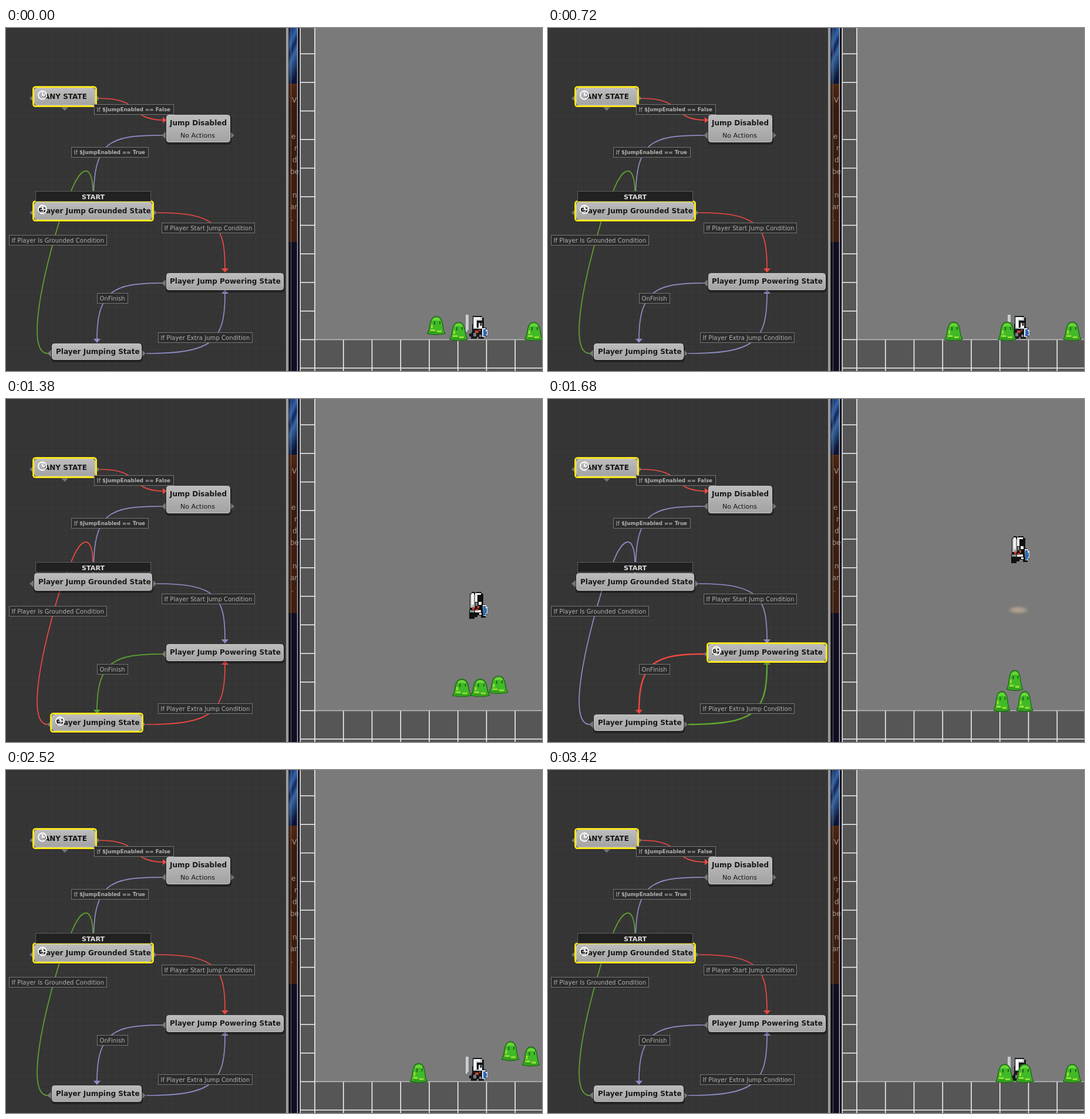
An HTML page that plays this animation: 913x585 px, repeating every 3.48 s.

```html
<!DOCTYPE html>
<html lang="en">
<head>
<meta charset="utf-8">
<title>Jump state machine</title>
<style>
html, body { margin: 0; width: 100%; height: 100%; overflow: hidden; background: #343434; }
svg { display: block; width: 913px; height: 585px; font-family: "DejaVu Sans", Verdana, sans-serif; }
.name { font-weight: bold; font-size: 12px; fill: #171717; }
.label rect { fill: #2c2c2c; stroke: #757575; }
.label text { font-size: 10px; letter-spacing: .07px; fill: #b2b2b2; }
.label .var { font-weight: bold; font-size: 8.7px; letter-spacing: 0; }
.edge path { fill: none; stroke: var(--c); stroke-width: var(--w, 1.7); }
.edge polygon { fill: var(--c); }
.port { fill: #777; }
.ring { fill: none; stroke: #f8e41c; stroke-width: 3; }
.clock { fill: none; stroke: #fff; stroke-width: 1.8; }
.grid { stroke: #f2f2f2; stroke-width: 1.6; fill: none; }
</style>
</head>
<body>
<svg id="stage" viewBox="0 0 913 585">
  <defs>
    <linearGradient id="steel" x2="0" y2="1"><stop stop-color="#bdbdbd"/><stop offset="1" stop-color="#a3a3a3"/></linearGradient>
    <linearGradient id="sky" x2=".35" y2="1">
      <stop stop-color="#10204e"/><stop offset=".3" stop-color="#2f64ae"/><stop offset=".45" stop-color="#12265a"/>
      <stop offset=".6" stop-color="#3468a8"/><stop offset="1" stop-color="#0a1538"/>
    </linearGradient>
    <linearGradient id="wood" x2="0" y2="1"><stop stop-color="#522710"/><stop offset=".16" stop-color="#371a0d"/><stop offset="1" stop-color="#40200f"/></linearGradient>
    <pattern id="mesh" width="12" height="12" patternUnits="userSpaceOnUse">
      <path d="M0 .5H12M.5 0V12" stroke="#000" stroke-opacity=".08"/>
    </pattern>
    <filter id="blur" x="-50%" y="-100%" width="200%" height="300%"><feGaussianBlur stdDeviation="3 2.2"/></filter>
    <clipPath id="view"><rect x="502" width="411" height="585"/></clipPath>
    <g id="slime">
      <path d="M-15-2Q-12-7-11-16Q-9-31 0-31Q9-31 11-16Q12-7 15-2Q8 0 0 0Q-8 0-15-2Z" fill="#40ba27" stroke="#226d17" stroke-width="1.6"/>
      <path d="M-12-3Q0 0 12-3L10-7Q0-3-10-7Z" fill="#319e1e"/>
      <path d="M-6-27Q0-31 6-27L7-23Q0-26-7-23Z" fill="#6bd63b"/>
      <path d="M-10-9h8v3h-8zM1-7h8v3h-8zM-9-17h3v6h-3z" fill="#97e036"/>
      <path d="M-4-23h2v6h-2zM5-23h2v5h-2z" fill="#1b6a18"/>
    </g>
  </defs>
  <rect width="477" height="585" fill="#363636"/>
  <rect width="477" height="585" fill="url(#mesh)"/>
  <g id="edges"></g>
  <g id="nodes"></g>
  <g id="labels"></g>

  <rect x="477" width="4.5" height="585" fill="#9a9a9a"/>
  <rect x="481.5" width="20.5" height="585" fill="#0b0a14"/>
  <rect x="486" width="10" height="585" fill="#100e22"/>
  <rect x="482" width="15" height="95" fill="url(#sky)"/>
  <rect x="482" y="95" width="15" height="270" fill="url(#wood)"/>
  <path d="M485.5 0V585" stroke="#68686f"/>
  <g id="scraps" font-size="12" fill="#a69b94"></g>
  <path d="M496.5 0V585" stroke="#b4b4bd" stroke-width="1.4"/>
  <path d="M501.2 0V585" stroke="#eee" stroke-width="1.6"/>

  <g clip-path="url(#view)">
    <rect x="502" width="411" height="585" fill="#7a7a7a"/>
    <g id="world">
      <rect x="502" y="-60" width="24" height="700" fill="#565656"/>
      <rect x="502" y="531" width="411" height="90" fill="#565656"/>
      <path id="tiles" class="grid"/>
      <path d="M526 531.5H913" stroke="#bcbcbc" stroke-width="1.4"/>
      <ellipse id="dust" cx="801" cy="360" rx="14" ry="5" fill="#c9b299" filter="url(#blur)"/>
      <g id="stand"></g>
      <g id="leap"></g>
      <g id="slimes"></g>
    </g>
  </g>
</svg>
<script>
const LOOP = 3480, STEP = 60;
const RED = '#ee4842', GREEN = '#5fa42f', IDLE = '#8f8dc6';
const $ = id => document.getElementById(id);

function add(parent, tag, attrs = {}, text) {
  const el = document.createElementNS('http://www.w3.org/2000/svg', tag);
  for (const k in attrs) el.setAttribute(k, attrs[k]);
  if (text) el.textContent = text;
  parent.append(el);
  return el;
}

function edge(d, arrow) {
  const g = add($('edges'), 'g', { class: 'edge' });
  add(g, 'path', { d });
  if (arrow) add(g, 'polygon', { points: arrow });
  return (color, width = 1.7) => {
    g.style.setProperty('--c', color);
    g.style.setProperty('--w', width);
  };
}

function port(x, y, dir) {
  const d = { l: 'l7-6v12z', r: 'l-7-6v12z', d: 'l-6-6h12z' }[dir];
  add($('nodes'), 'path', { class: 'port', d: `M${x} ${y}${d}` });
}

function node(x, y, w, h, title, tx, ty, cx) {
  const g = add($('nodes'), 'g');
  add(g, 'rect', { x: x - 1, y: y + 1, width: w + 3, height: h + 3, rx: 5, fill: '#000', opacity: .35 });
  add(g, 'rect', { x: x + .5, y: y + .5, width: w - 1, height: h - 1, rx: 4, fill: 'url(#steel)', stroke: '#c4c4c4' });
  add(g, 'text', { x: tx, y: ty, class: 'name' }, title);
  const mark = add(g, 'g', { visibility: 'hidden' });
  if (cx) {
    const cy = ty - 6.5;
    add(mark, 'rect', { x: x - 1.5, y: y - 1.5, width: w + 3, height: h + 3, rx: 4, class: 'ring' });
    add(mark, 'circle', { cx, cy, r: 7, class: 'clock' });
    add(mark, 'path', { d: `M${cx} ${cy - 5}v5h5`, class: 'clock' });
  }
  return on => mark.setAttribute('visibility', on ? 'visible' : 'hidden');
}

function label(x, y, w, text, variable) {
  const g = add($('labels'), 'g', { class: 'label' });
  add(g, 'rect', { x: x + .5, y: y + .5, width: w - 1, height: 17 });
  add(g, 'text', { x: x + 4.5, y: y + 12.5 }, text);
  if (variable) add(g, 'text', { x: x + 14, y: y + 12, class: 'var' }, variable);
}

// Graph
edge('M160 120C235 120 206 157 270 157', '267,152 274,157 267,162')(RED);
edge('M266 183C175 183 149 192 149 297')(IDLE);
const toGround = edge('M71 555C38 555 54 452 91 329L111 278C128 235 147 230 148 278V297');
const toPower = edge('M257 315C362 315 373 340 373 411', '367,410 379,410 373,417');
const toJump = edge('M266 435C185 435 155 447 155 531', '149,530 161,530 155,537');
const toExtra = edge('M239 555C352 555 373 535 373 453', '367,453 379,453 373,446');

[[40, 120, 'l'], [160, 120, 'r'], [100, 141, 'd'], [265, 183, 'l'], [389, 183, 'r'],
 [40, 315, 'l'], [257, 315, 'r'], [265, 435, 'l'], [70, 555, 'l'], [238, 555, 'r']].forEach(p => port(...p));

node(48, 102, 104, 30, 'ANY STATE', 65, 121, 62)(true);
node(273, 148, 109, 47, 'Jump Disabled', 279, 166);
add($('nodes'), 'text', { x: 297, y: 187, 'font-size': 11.1, fill: '#171717' }, 'No Actions');
const marks = {
  ground: node(48, 297, 201, 30, 'Player Jump Grounded State', 55, 316, 62),
  power: node(273, 418, 200, 29, 'Player Jump Powering State', 279, 436, 287),
  jump: node(78, 538, 153, 28, 'Player Jumping State', 85, 556, 92)
};
add($('nodes'), 'rect', { x: 50.5, y: 278.5, width: 196, height: 17, fill: '#212121', stroke: '#5d5d5d' });
add($('nodes'), 'text', { x: 129, y: 292, 'font-size': 11.2, 'font-weight': 'bold', fill: '#ddd' }, 'START');
label(150, 130, 136, 'If', '$JumpEnabled == False');
label(111, 203, 132, 'If', '$JumpEnabled == True');
label(265, 332, 159, 'If Player Start Jump Condition');
label(5, 353, 167, 'If Player Is Grounded Condition');
label(155, 452, 53, 'OnFinish');
label(259, 519, 161, 'If Player Extra Jump Condition');

[['V', 487, 127], ['e', 486, 189], ['r', 491, 209], ['d', 488, 229], ['be', 484, 249],
 ['n', 488, 289], ['ar', 484, 309], ['.', 486, 329]].forEach(([s, x, y]) => add($('scraps'), 'text', { x, y }, s));

// Game view
let grid = 'M526 -60V640';
for (let i = -2; i < 10; i++) grid += `M502 ${44 + i * 48.75}h24`;
for (let i = 1; i < 9; i++) grid += `M${526 + i * 48.75} 531v110`;
$('tiles').setAttribute('d', grid + 'M502 531.5h24M502 580H913');

const blocks = (id, list) => list.forEach(([fill, d]) => add($(id), 'path', { fill, d }));
blocks('stand', [
  ['#15171a', 'M795 491h16v3h3v17h4v16h-4v3h-9v-3h-3v3h-10v-4h-3v-8h5v-13h1z'],
  ['#c9cccf', 'M783 489h5v3h3v23h-5v3h-3z'],
  ['#77797c', 'M788 492h3v23h-3zM784 518h9v3h-9zM796 520h5v6h-5zM806 523h4v4h-4z'],
  ['#c3c8ca', 'M796 493h15v20h-15z'],
  ['#f3f5f5', 'M797 493h11v4h-7v14h-4zM805 507h6v5h-6z'],
  ['#15171a', 'M802 499h10v4h-10zM802 503h3v8h-3zM808 503h2v5h-2z'],
  ['#cf4030', 'M799 516h6v4h-6zM806 514h2v3h-2z'],
  ['#e8eef2', 'M811 512h6v3h3v9h-3v3h-6z'],
  ['#2e69b5', 'M813 514h4v3h2v6h-2v3h-4z']
]);
blocks('leap', [
  ['#111', 'M790 493h3v-3h5v1h3v-1h9v3h3v18h4v3h2v16h-2v4h-8v-4h-6v3h-5v3h-9v-16h1z'],
  ['#bcbfc1', 'M791 494h7v23h-7z'],
  ['#f1f2f2', 'M793 492h4v20h-4zM799 492h10v3h-6v12h-4z'],
  ['#85888a', 'M797 496h2v21h-2zM790 521h8v4h-8zM800 508h3v6h-3z'],
  ['#f3f3ef', 'M805 507h5v5h-5zM799 521h10v4h-10zM806 526h4v3h-4z'],
  ['#d2452e', 'M794 516h4v4h-4zM803 514h3v4h-3zM800 519h4v3h-4z'],
  ['#dbe7ef', 'M812 512h6v3h2v12h-2v4h-5z'],
  ['#316bb0', 'M813 514h4v4h2v8h-2v4h-4z']
]);

// Hops: start, end, from x, to x, height
const hops = [
  [[-30, 420, 736, 691, 40], [780, 1100, 691, 778, 40], [1300, 1560, 778, 773, 30], [1720, 2060, 773, 703, 40], [2760, 3180, 703, 778, 39]],
  [[150, 480, 771, 782, 36], [860, 1100, 782, 806, 36], [1300, 1560, 806, 812, 30], [1740, 2060, 812, 898, 40], [2300, 2600, 898, 893, 36]],
  [[200, 500, 899, 893, 36], [1180, 1450, 893, 820, 40], [1470, 1875, 820, 772, 36], [2250, 2680, 772, 911, 40], [2850, 3290, 911, 812, 47]]
];
const slimes = hops.map(() => add($('slimes'), 'use', { href: '#slime' }));

function slimeAt(list, t) {
  let pos = [list[0][2], 0];
  for (const [a, b, x0, x1, h] of list) {
    if (t < a) break;
    const p = Math.min(1, (t - a) / (b - a));
    pos = [x0 + (x1 - x0) * p, 4 * h * p * (1 - p)];
  }
  return pos;
}

function track(points, t) {
  for (let i = 1; i < points.length; i++) {
    const [a, u] = points[i - 1], [b, v] = points[i];
    if (t <= b) return u + (v - u) * (1 - Math.cos(Math.PI * (t - a) / (b - a))) / 2;
  }
  return points[points.length - 1][1];
}

const stretch = [[0, 0], [1140, .2], [1420, -.5], [1680, 1], [2100, -1], [2400, .5], [2940, .1], [LOOP, 0]];
const camera = [[0, 0], [1700, 0], [2000, 27.5], [2340, 0]];

// Arcs: start, apex, end, start height, apex height
const arcs = [[945, 1500, 1500, 0, 169], [1500, 1860, 2146, 169, 285], [2560, 2980, 3210, 0, 151]];

function playerHeight(t) {
  for (const [a, m, b, h0, top] of arcs) {
    if (t < a || t >= b) continue;
    return t < m ? top - (top - h0) * ((m - t) / (m - a)) ** 2 : top * (1 - ((t - m) / (b - m)) ** 2);
  }
  return 0;
}

const states = [[0, 'ground'], [945, 'power'], [1080, 'jump'], [1500, 'extra'], [1700, 'jump'],
  [2146, 'ground'], [2560, 'power'], [2700, 'jump'], [3210, 'ground']];
const colors = {
  ground: [GREEN, RED, IDLE, IDLE],
  power: [IDLE, GREEN, RED, IDLE],
  extra: [IDLE, IDLE, RED, GREEN],
  jump: [RED, IDLE, GREEN, RED]
};

function draw(t) {
  const [since, state] = states.filter(s => s[0] <= t).pop();
  const active = state === 'extra' ? 'power' : state;
  for (const k in marks) marks[k](k === active);
  const [ground, power, jump, extra] = colors[state];
  const fresh = since > 0 && t - since < 120 ? 2.5 : 1.7;
  toGround(ground, state === 'ground' ? fresh : 1.7);
  toPower(power, state === 'power' ? 2.5 : 1.7);
  toJump(jump, active === 'power' ? 2.5 : state === 'jump' ? fresh : 1.7);
  toExtra(extra, state === 'extra' ? 2.5 : 1.7);

  const h = playerHeight(t);
  $('stand').style.display = h > 0 ? 'none' : '';
  $('leap').style.display = h > 0 ? '' : 'none';
  $('leap').setAttribute('transform', `translate(0 ${-Math.round(h)})`);
  $('world').setAttribute('transform', `translate(0 ${Math.round(track(camera, t))})`);
  const age = (t - 1500) / 360;
  $('dust').setAttribute('opacity', age >= 0 && age < 1 ? 1 - age * .6 : 0);

  const s = track(stretch, t);
  slimes.forEach((el, i) => {
    const [x, y] = slimeAt(hops[i], t);
    el.setAttribute('transform', `translate(${x} ${533 - y}) scale(${1 - s * .1} ${1 + s * .1})`);
  });
}

const begin = performance.now();
function tick() {
  const t = (performance.now() - begin) % LOOP;
  draw(Math.floor(t / STEP) * STEP);
  requestAnimationFrame(tick);
}
draw(0);
requestAnimationFrame(tick);
</script>
</body>
</html>
```
